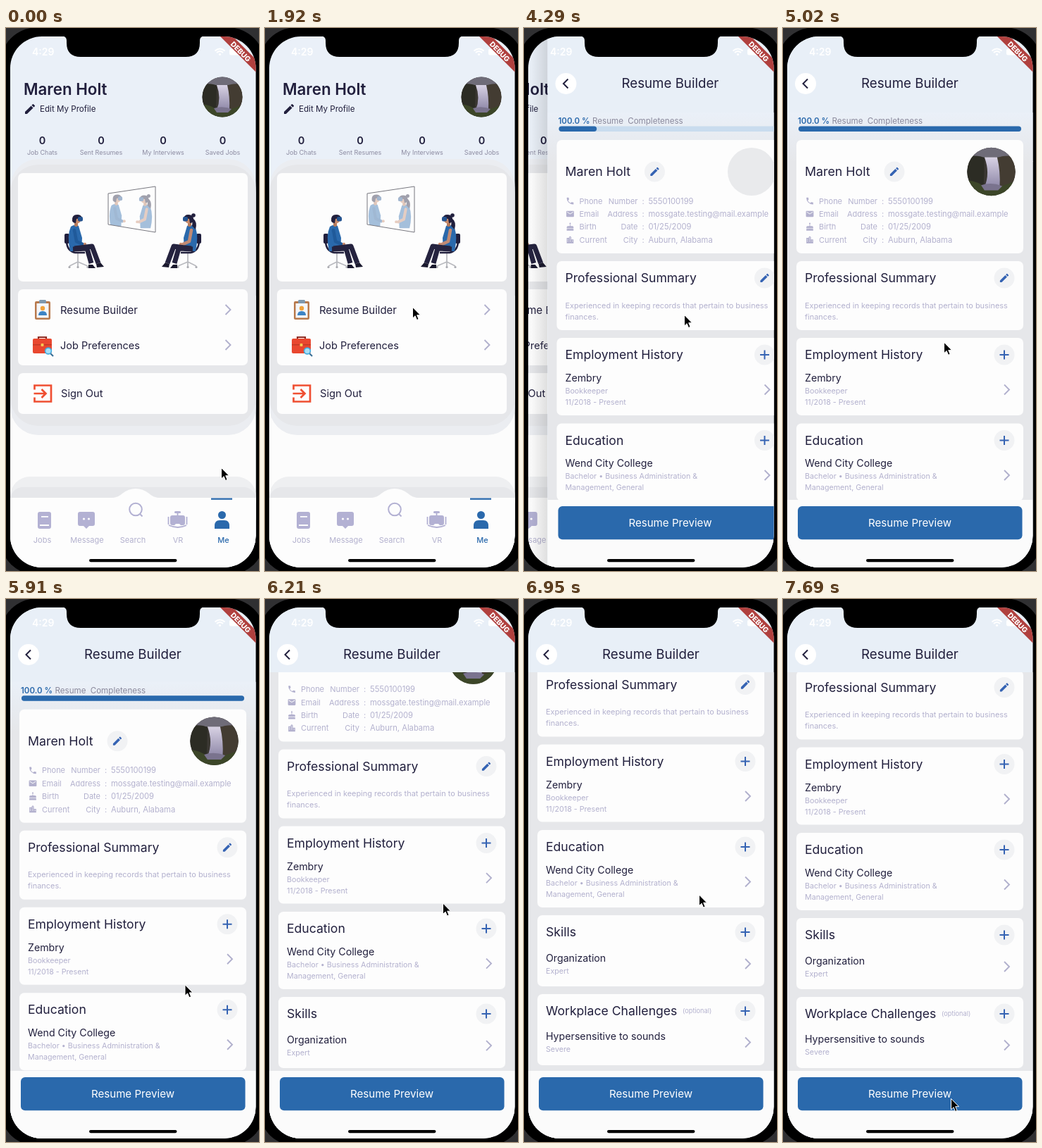
Recreate the animation shown at these times as an HTML page. Size 359 by 771 pixels, loop 8000 ms.

```html
<!DOCTYPE html>
<html lang="en">
<head>
<meta charset="utf-8">
<title>Resume app</title>
<style>
html, body { margin: 0; width: 100%; height: 100%; overflow: hidden; background: #000; }
svg { display: block; width: 359px; height: 771px; font-family: Inter, "Open Sans", sans-serif; }
</style>
</head>
<body>
<svg id="stage" viewBox="0 0 359 771"></svg>
<script>
const INK = '#211f3d', BLUE = '#2a69ac', LILAC = '#b3b1ce', CARD = '#fdfdfd', GREY = '#e6e7ea';
const NAME = 'Maren Holt';

const ICONS = {
  pencil: 'M3 17.25V21h3.75L17.8 9.94l-3.75-3.75zM20.7 7.04a1 1 0 0 0 0-1.41l-2.34-2.34a1 1 0 0 0-1.41 0l-1.83 1.83 3.75 3.75z',
  phone: 'M6.6 10.8a15 15 0 0 0 6.6 6.6l2.2-2.2a1 1 0 0 1 1-.24 11 11 0 0 0 3.6.57 1 1 0 0 1 1 1V20a1 1 0 0 1-1 1A17 17 0 0 1 3 4a1 1 0 0 1 1-1h3.5a1 1 0 0 1 1 1 11 11 0 0 0 .57 3.6 1 1 0 0 1-.25 1z',
  mail: 'M4 4h16a2 2 0 0 1 2 2v12a2 2 0 0 1-2 2H4a2 2 0 0 1-2-2V6a2 2 0 0 1 2-2zm16 4V6l-8 5-8-5v2l8 5z',
  cake: 'M12 6a2 2 0 0 0 2-2l-2-4-2 4a2 2 0 0 0 2 2zM11 7h2v3h5a3 3 0 0 1 3 3v2q-2 2-4.5 0-2 2-4.5 0-2 2-4.5 0-2.5 2-4.5 0v-2a3 3 0 0 1 3-3h5zM3 17q2.5 1 4.5-.5 2 1.5 4.5 0 2.5 1.5 4.5 0 2 1.5 4.5.5v5H3z',
  city: 'M15 11V5l-3-3-3 3v2H3v14h18V11zM5 10h2v2H5zM5 14h2v2H5zM11 6h2v2h-2zM11 10h2v2h-2zM11 14h2v2h-2zM17 14h2v2h-2z'
};

const text = (x, y, size, str, fill = INK, more = '') =>
  `<text x="${x}" y="${y}" font-size="${size}" fill="${fill}" ${more}>${str}</text>`;
const mid = (x, y, size, str, fill, weight = 400) =>
  text(x, y, size, str, fill, `text-anchor="middle" font-weight="${weight}"`);
const rect = (x, y, w, h, r, fill, more = '') =>
  `<rect x="${x}" y="${y}" width="${w}" height="${h}" rx="${r}" fill="${fill}" ${more}/>`;
const disc = (x, y, r, fill, more = '') => `<circle cx="${x}" cy="${y}" r="${r}" fill="${fill}" ${more}/>`;
const fillPath = (d, fill, more = '') => `<path d="${d}" fill="${fill}" ${more}/>`;
const line = (d, color, w, more = '') =>
  `<path d="${d}" fill="none" stroke="${color}" stroke-width="${w}" ${more}/>`;
const icon = (name, x, y, s, fill) =>
  fillPath(ICONS[name], fill, `fill-rule="evenodd" transform="translate(${x - 12 * s} ${y - 12 * s}) scale(${s})"`);
const chevron = (x, y) => line(`M${x - 3.5} ${y - 7}l7 7-7 7`, '#b1b0cd', 1.9);
const card = (y, h, x = 19, w = 322) => rect(x, y, w, h, 7, CARD);

// Head and torso facing right; the sleeve colour and hair vary.
const upper = (id, sleeve, hair) => `<g id="${id}">
  ${fillPath('M92 282q6-4 11-1l5 17-1 19H91q-5-22 1-35Z', BLUE)}
  ${rect(97, 275, 5, 7, 2, '#b57a5c')}
  ${disc(101, 272, 5.4, '#c98b6b')}
  ${fillPath('M94 274q-1-9 7-9 6 0 7 5l-8 1-1 6q-4 0-5-3Z', INK)}
  ${rect(102, 268, 7, 6.5, 2, '#24538f')}
  ${hair}
  ${line('M97 287L100 303 109 307', sleeve, 4.5, 'stroke-linejoin="round" stroke-linecap="round"')}
  ${disc(112, 307, 2.2, '#c98b6b')}
</g>`;

const sitter = (id, top) => `<g id="${id}">
  ${line('M102 319V334M102 332L90 338M102 332L116 338M102 332V339', '#b9babf', 1.8)}
  ${[90, 102, 116].map(x => disc(x, 339.5, 1.6, '#a9aab0')).join('')}
  ${rect(83, 292, 7, 14, 2, INK)}
  ${line('M86 304Q87 317 98 319H112', INK, 2.5)}
  <use href="#${top}"/>
  ${line('M95 314L115 313 121 334M97 313L122 310 131 334', '#25233f', 7, 'stroke-linejoin="round"')}
  ${fillPath('M117 341v-5h6l4 5ZM129 340l-1-5 6-2 5 6Z', '#1a192e')}
</g>`;

const defs = `<defs>
  <clipPath id="screen">${rect(6, 12, 348.5, 754, 45)}</clipPath>
  <clipPath id="body">${rect(6, 104, 349, 566, 0)}</clipPath>
  <clipPath id="pane"><path d="M145 235L212 225V290L145 279Z"/></clipPath>
  <clipPath id="round">${disc(0, 0, 28.5)}</clipPath>
  <linearGradient id="fade" x2="0" y2="1"><stop stop-color="#eaf0f8"/><stop offset="1" stop-color="${GREY}"/></linearGradient>
  <linearGradient id="edge"><stop stop-opacity="0"/><stop offset="1" stop-opacity=".12"/></linearGradient>
  <linearGradient id="water" x2="0" y2="1"><stop stop-color="#d8d2e4"/><stop offset="1" stop-color="#8f88a8"/></linearGradient>
  <g id="photo" clip-path="url(#round)">
    ${disc(0, 0, 29, '#3a3732')}
    ${rect(-29, -29, 58, 12, 0, '#6f6c78')}
    ${fillPath('M-29-18Q-14-20-8-16L-9 16-29 12Z', '#2c2c24')}
    ${fillPath('M29-18Q14-20 7-16L11 18 29 14Z', '#433c32')}
    ${fillPath('M-8-17H7Q11 0 10 18H-8Q-1 2-8-17Z', 'url(#water)')}
    ${fillPath('M-29 10Q-14 12-9 18T29 11V29H-29Z', '#3c4628')}
    ${fillPath('M-12 16Q0 12 13 17L8 22H-8Z', '#7a738e')}
  </g>
  ${upper('man', '#205a9a', '')}
  ${upper('woman', '#c08a74', disc(94, 266, 2.8, INK) + fillPath('M95 270q-7 5-4 16l5-5Z', INK))}
  ${sitter('left', 'man')}
  ${sitter('right', 'woman')}
</defs>`;

function menuIcons() {
  return rect(41, 388, 22, 26, 2, '#b8794c') + rect(43.5, 391, 17, 20.5, 0, '#f4f6fa') +
    rect(47, 386, 10, 5, 1.5, '#7f98ad') + disc(52, 398, 3.2, '#f0a23c') +
    fillPath('M46 408q0-6 6-6t6 6Z', '#3d83c4') +
    line('M46 442v-3h11v3', '#8f2c22', 2.2) + rect(38, 441, 27, 21, 2, '#e9472f') +
    rect(38, 449, 27, 1.5, 0, '#c23a26') + rect(49.5, 448, 4, 4, 1, '#f7c552') +
    line('M63 462l4 4', '#3a6f96', 2.2) + disc(60, 458.5, 4.4, '#a9e0f7', 'stroke="#41ade0" stroke-width="1.6"') +
    line('M40.5 513.5V507.5H64V530.5H40.5V524.5M39.5 519H56M50.5 513l6 6-6 6', '#ef4f32', 2.7);
}

function navBar() {
  const c = '#b3b1d3';
  const labels = [['Jobs', 51.5], ['Message', 115], ['Search', 180], ['VR', 244], ['Me', 308.5]];
  return rect(6, 637, 349, 60, 28, '#eeeff1') + rect(6, 652, 349, 60, 18, GREY) +
    rect(6, 667, 349, 110, 0, CARD) + fillPath('M150 667.5Q160 666 165 661 174 654 184 654T203 661Q208 666 218 667.5Z', CARD) +
    rect(291, 667.5, 30, 2.3, 0, BLUE) +
    rect(45, 687, 19, 24, 3, c) + rect(50, 693, 10, 1.8, 0, CARD) + rect(48, 705, 13, 2, 0, CARD) +
    fillPath('M105 687h18q3 0 3 3v14q0 3-3 3h-5l-4 4-4-4h-5q-3 0-3-3v-14q0-3 3-3Z', c) +
    disc(110.5, 697, 1.6, CARD) + disc(117.5, 697, 1.6, CARD) +
    disc(184, 683.5, 8.8, 'none', `stroke="${c}" stroke-width="2"`) + line('M190 690l3.5 3.5', c, 2) +
    rect(239, 686, 9, 3, 1.5, c) + line('M243.500 687v6', c, 2) +
    fillPath('M236 692h15q3 0 3 3v8q0 3-3 3h-3l-2-2h-5l-2 2h-3q-3 0-3-3v-8q0-3 3-3Z', c) +
    line('M230.5 694v11M256.5 694v11M231 706q13 6 25 0', c, 1.8) +
    disc(306.5, 691.5, 5.5, BLUE) + fillPath('M296 711v-4q0-8 7-8h7q7 0 7 8v4Z', BLUE) +
    labels.map(([s, x]) => mid(x, 730.5, 11, s, s === 'Me' ? BLUE : LILAC, s === 'Me' ? 500 : 400)).join('');
}

function homePage() {
  const stats = [['Job Chats', 51.5], ['Sent Resumes', 135], ['My Interviews', 223], ['Saved Jobs', 307.5]];
  return rect(6, 12, 349, 754, 0, '#eaf0f8') + rect(6, 380, 349, 386, 0, '#fcfcfc') +
    rect(6, 186, 349, 392, 40, '#ebedf1') + rect(6, 194, 349, 371, 40, GREY) +
    text(25, 95, 22.3, NAME, INK, 'font-weight="600"') +
    icon('pencil', 34, 115, .78, INK) + text(48, 119.3, 11.6, 'Edit My Profile') +
    '<use href="#photo" x="307" y="98"/>' +
    stats.map(([s, x]) => mid(x, 165, 14.5, '0', INK, 600) + mid(x, 180, 9, s, '#8d8ca2')).join('') +
    card(206, 154, 17, 326) + card(371, 108, 17, 326) + card(490, 58, 17, 326) +
    '<use href="#left"/><use href="#right" transform="translate(360) scale(-1 1)"/>' +
    '<g clip-path="url(#pane)" opacity=".42"><use href="#man" transform="translate(67 -2) scale(.9)"/>' +
    '<use href="#woman" transform="translate(287 -1) scale(-.9 .9)"/></g>' +
    line('M145 235L212 225V290L145 279Z', '#77777f', 1) +
    menuIcons() +
    text(77, 405.5, 14.9, 'Resume Builder') + text(77, 455.5, 14.5, 'Job Preferences') + text(78, 524.3, 14.7, 'Sign Out') +
    chevron(315, 400) + chevron(315, 450) + navBar();
}

const button = (x, y, plus) => disc(x, y, 14.5, '#f1f2f4') +
  (plus ? line(`M${x - 6.5} ${y}h13M${x} ${y - 6.5}v13`, '#3563b3', 2) : icon('pencil', x, y, .68, '#3563b3'));

function section(top, h, title, plus, name, nameY, notes, noteY, arrowY) {
  return card(top, h) + text(31, top + 30, 17.6, title) + button(314, top + 24, plus) +
    (name ? text(31, top + nameY, 14.2, name) + chevron(317.5, top + arrowY) : '') +
    notes.map((s, i) => text(31, top + noteY + 16 * i, name ? 10.7 : 10.95, s, LILAC)).join('');
}

function resumeContent() {
  const rows = [
    ['phone', 'Phone', 'Number', '5550100199'],
    ['mail', 'Email', 'Address', 'mossgate.testing@mail.example'],
    ['cake', 'Birth', 'Date', '01/25/2009'],
    ['city', 'Current', 'City', 'Auburn, Alabama']
  ];
  return rect(6, 120, 349, 70, 0, 'url(#fade)') + rect(6, 189, 349, 760, 0, GREY) +
    text(21, 136, 11.5, '100.0 %', BLUE, 'font-weight="600"') +
    text(69.5, 136, 11.6, 'Resume Completeness', '#8a899c', 'word-spacing="3"') +
    rect(22, 139.5, 316, 7.5, 3.7, '#c9dcee') + rect(22, 139.5, 0, 7.5, 3.7, BLUE, 'id="bar"') +
    card(159, 161) + text(31, 210, 17.8, NAME) + button(158, 204) +
    disc(295.5, 204, 34, '#e9eaec') + '<use id="avatar" href="#photo" transform="translate(295.5 204) scale(1.2)"/>' +
    rows.map(([pic, a, b, value], i) => {
      const y = 249.6 + 18.4 * i;
      return icon(pic, 38, y - 4, .54, LILAC) + text(51, y, 11, a, LILAC) +
        text(134, y, 11, b, LILAC, 'text-anchor="end"') + text(140, y, 11, ':', LILAC) + text(149, y, 11.2, value, LILAC);
    }).join('') +
    section(331, 98, 'Professional Summary', false, '', 0,
      ['Experienced in keeping records that pertain to business', 'finances.'], 66.5) +
    section(440, 110, 'Employment History', true, 'Zembry', 62, ['Bookkeeper', '11/2018 - Present'], 79, 73.5) +
    section(561.5, 110, 'Education', true, 'Wend City College', 61.5,
      ['Bachelor • Business Administration &amp;', 'Management, General'], 78.5, 73.5) +
    section(682.5, 101, 'Skills', true, 'Organization', 65.5, ['Expert'], 82.5, 69) +
    section(794.5, 101, 'Workplace Challenges', true, 'Hypersensitive to sounds', 65, ['Severe'], 82, 68.5) +
    text(225, 821.5, 9.2, '(optional)', LILAC);
}

const resumePage = () =>
  rect(-20, 12, 26, 754, 0, 'url(#edge)') + rect(6, 12, 349, 754, 0, '#e8eff7') +
  `<g clip-path="url(#body)"><g id="scroll">${resumeContent()}</g></g>` +
  disc(32, 79, 15, '#fff') + line('M35 72.5L28.5 79 35 85.5', INK, 2) +
  mid(180, 85.3, 18.7, 'Resume Builder', INK) +
  rect(6, 670, 349, 96, 0, '#fbfbfb') + rect(21, 679, 318.5, 47.2, 6, BLUE) +
  mid(180, 708, 15.1, 'Resume Preview', '#fff');

const overlay =
  text(37, 39, 14, '4:29', '#fff', 'font-weight="600"') +
  line('M296.5 32.5q7-6 14 0M299 35q4.5-4 9 0', '#fff', 1.9) + disc(303.5, 37.5, 1.6, '#fff') +
  rect(317, 29.5, 17, 9, 2.5, '#fff') +
  fillPath('M304 12H322L355 45V63Z', '#b0403e') +
  `<g transform="translate(333 33.5) rotate(45)">${mid(0, 3.6, 10.2, 'DEBUG', '#fff', 800)}</g>` +
  rect(118, 754, 124.5, 4.2, 2.1, '#000') +
  fillPath('M79 11Q86 12 86 18V21Q86 41 106 41H255Q275 41 275 21V18Q275 12 282 11Z', '#000');

const stage = document.getElementById('stage');
stage.innerHTML = defs + rect(0, 0, 359, 771, 0, '#303032') + rect(-9, -1, 377, 778, 54, '#000') +
  `<g clip-path="url(#screen)"><g id="home">${homePage()}</g><g id="page">${resumePage()}</g>${overlay}</g>` +
  `<path id="cursor" d="M0 0V15.5L3.6 12.2 6 18 8.6 16.9 6.2 11.2H11Z" fill="#000" stroke="#fff" stroke-width="1"/>`;

const el = id => document.getElementById(id);
const [home, page, scroller, bar, avatar, cursor] = ['home', 'page', 'scroll', 'bar', 'avatar', 'cursor'].map(el);
const clamp = v => Math.min(1, Math.max(0, v));

// Rows of [time, ...values], joined by straight segments.
const CURSOR = [[200, 305.5, 624.5], [450, 292, 613], [750, 250, 585], [1000, 226, 530], [1320, 209, 410], [1470, 209, 405],
  [1920, 209.5, 396.5], [2450, 209.5, 396.5], [3500, 227.5, 407.5], [4730, 227.5, 407.5], [5020, 228.5, 446], [5400, 246, 540],
  [5760, 254, 550], [5910, 254, 548], [6060, 254, 505], [6210, 252.5, 432], [6360, 250, 421], [6500, 248.5, 420],
  [7150, 248.5, 420], [7390, 250, 545], [7540, 244, 675], [7690, 238.5, 709.5]];
const SCROLL = [[5850, 0], [5910, 2], [6060, 45], [6210, 117], [6360, 180], [6500, 222], [6650, 238], [6800, 238],
  [6950, 233.5], [7240, 230.3], [7400, 229.5]];

function track(keys, t) {
  const i = keys.findIndex(k => k[0] > t);
  if (i < 1) return keys[i ? keys.length - 1 : 0].slice(1);
  const a = keys[i - 1], b = keys[i], p = (t - a[0]) / (b[0] - a[0]);
  return a.slice(1).map((v, n) => v + (b[n + 1] - v) * p);
}

// Fast start, long settle: cubic-bezier(.35, .91, .33, .97).
function slide(x) {
  const bez = (s, a, b) => 3 * (1 - s) ** 2 * s * a + 3 * (1 - s) * s * s * b + s ** 3;
  let lo = 0, hi = 1;
  for (let i = 0; i < 20; i++) {
    const s = (lo + hi) / 2;
    if (bez(s, .35, .33) < x) lo = s; else hi = s;
  }
  return bez(lo, .91, .97);
}

function draw(now) {
  const t = now % 8000;
  const p = slide(clamp((t - 4090) / 400));
  home.setAttribute('transform', `translate(${-349 / 3 * p})`);
  page.setAttribute('transform', `translate(${349 * (1 - p)})`);
  page.setAttribute('display', t < 4090 ? 'none' : 'inline');
  bar.setAttribute('width', 316 * clamp((t - 4150) / 830));
  avatar.setAttribute('display', t < 4730 ? 'none' : 'inline');
  scroller.setAttribute('transform', `translate(0 ${-track(SCROLL, t)[0]})`);
  cursor.setAttribute('transform', `translate(${track(CURSOR, t)})`);
}

const start = performance.now();
(function loop() {
  draw(performance.now() - start);
  requestAnimationFrame(loop);
})();
</script>
</body>
</html>
```
